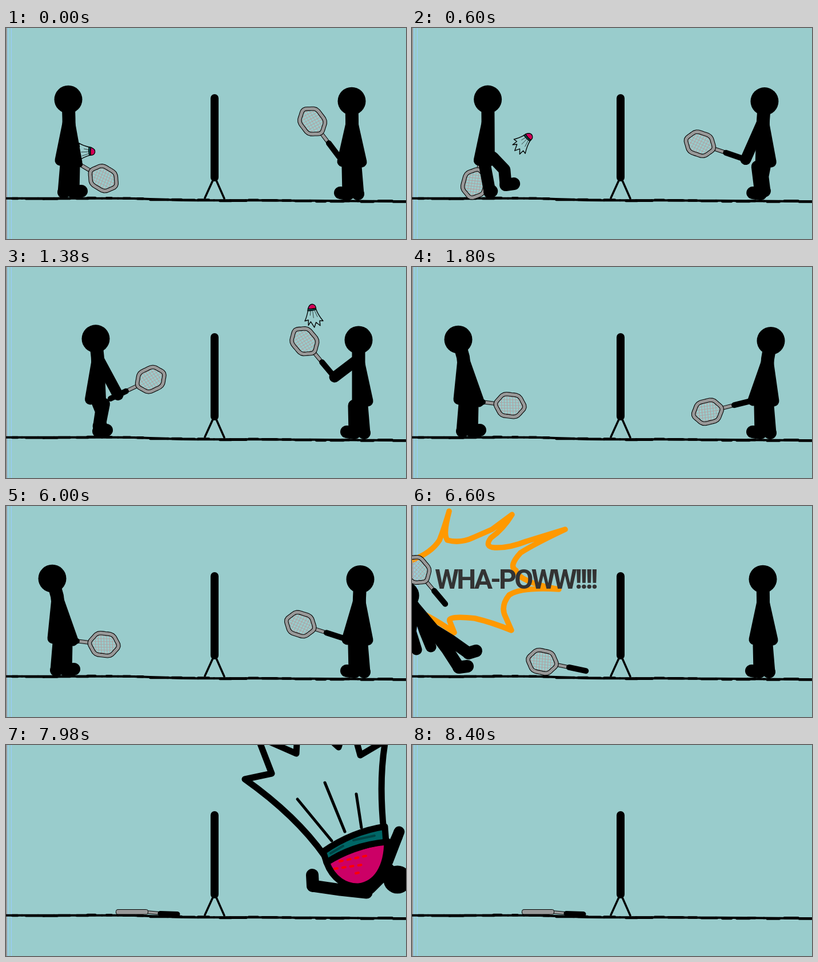
An HTML page with a canvas for the animation above (8640 ms loop, 700 px wide and 370 px high).

```html
<!DOCTYPE html>
<html lang="en">
<head>
<meta charset="utf-8">
<title>Badminton</title>
<style>
html, body { margin: 0; width: 100%; height: 100%; overflow: hidden; background: #99cccc; }
canvas { display: block; }
</style>
</head>
<body>
<canvas id="stage" width="700" height="370"></canvas>
<script>
const c = document.getElementById('stage').getContext('2d');
const LOOP = 8640, STEP = 60;
const SKY = '#99cccc', GREY = '#999999', ORANGE = '#ff9900';

const mix = (a, b, k) => a + (b - a) * k;
const part = (t, from, to) => Math.min(1, Math.max(0, (t - from) / (to - from)));
const smooth = k => k * k * (3 - 2 * k);
const random = seed => Math.abs(Math.sin(seed * 12.9898) * 43758.5453) % 1;
const radians = degrees => degrees * Math.PI / 180;

function line(points, width, color = '#000') {
  c.beginPath();
  points.forEach(p => c.lineTo(...p));
  c.lineWidth = width;
  c.strokeStyle = color;
  c.stroke();
}

function outline(path, width, color = '#000') {
  c.lineWidth = width;
  c.strokeStyle = color;
  c.stroke(path);
}

function placed(x, y, draw) {
  c.save();
  c.translate(x, y);
  draw();
  c.restore();
}

// ---- scenery ----
const groundY = x => 298.8 + 3.4 * smooth(part(x, 200, 330)) + 2 * part(x, 450, 700);

function ground() {
  for (let x = 0; x < 700; x += 28) {
    line([[x, groundY(x)], [x + 28, groundY(x + 28)]], 4);
    const from = x + 12 * random(x + 1), to = from + 8 + 24 * random(x + 2);
    const y = groundY(from) + 2 * random(x + 3) - 1;
    line([[from, y], [to, y]], 4.5);
  }
}

function scenery() {
  c.fillStyle = SKY;
  c.fillRect(0, 0, 700, 370);
  c.fillStyle = '#99ccff';
  c.fillRect(3, 0, 1, 370);
  c.fillRect(9, 0, 1, 370);
  c.fillStyle = GREY;
  c.fillRect(0, 0, 2, 370);
  ground();
  line([[365, 123], [365, 262]], 14);
  line([[348, 298], [363, 265], [367, 265], [382, 299]], 3.5);
}

// ---- racket: head centre at the origin, handle towards -x ----
const rim = new Path2D();
for (let i = 0; i < 36; i++) {
  const a = radians(i * 10), r = 1 + .04 * Math.cos(6 * a);
  rim.lineTo(24.5 * r * Math.cos(a), 20 * r * Math.sin(a));
}
rim.closePath();

function racket(x, y, degrees, squash = 1) {
  placed(x, y, () => {
    c.scale(1, squash);
    c.rotate(radians(degrees));
    line([[-44, 0], [-26, 0]], 7);
    line([[-44, 0], [-26, 0]], 5, GREY);
    line([[-78, 0], [-48, 0]], 10);
    c.save();
    c.clip(rim);
    for (let i = -25; i <= 25; i += 5) {
      line([[i - 4, -25], [i + 4, 25]], .9, '#b89a9a');
      line([[-28, i + 3], [28, i - 3]], .9, '#a9a5a5');
    }
    c.restore();
    outline(rim, 7.5);
    outline(rim, 5.3, GREY);
  });
}

function flatRacket() {
  line([[246, 293], [268, 295]], 6);
  line([[246, 293], [268, 295]], 4, GREY);
  line([[270, 295.5], [300, 296.5]], 9);
  const edge = new Path2D();
  edge.roundRect(192.5, 288.5, 56, 8.5, 3);
  c.fillStyle = GREY;
  c.fill(edge);
  outline(edge, 1);
}

// ---- shuttlecock, drawn large around its cork ----
const feathers = new Path2D('M558 195Q508 124 418 60L465 50L440 -15L508 15L512 -60L582 4L600 -55L620 18L664 -8Q652 60 661 150');
const band = new Path2D('M555 187Q605 152 663 143L665 170Q605 176 561 206Z');
const cork = new Path2D('M561 206C572 236 595 249 617 248C648 244 667 215 667 168Q605 178 561 206Z');

function shuttle(x, y, degrees, scale) {
  placed(x, y, () => {
    c.rotate(radians(degrees - 70));
    c.scale(scale, scale);
    c.translate(-615, -210);
    outline(feathers, 11);
    line([[510, 95], [570, 168]], 5);
    line([[558, 66], [593, 152]], 5);
    line([[613, 86], [622, 145]], 5);
    for (const [shape, color] of [[cork, '#cc0066'], [band, '#006666']]) {
      c.fillStyle = color;
      c.fill(shape);
      outline(shape, 11);
    }
    line([[568, 190], [590, 177]], 4, '#004444');
    line([[608, 167], [645, 159]], 4, '#004444');
    c.setLineDash([5, 9]);
    line([[584, 204], [632, 194]], 4, '#ff0000');
    line([[575, 217], [630, 209]], 4, '#ff0000');
    c.setLineDash([]);
    line([[612, 225], [617, 224]], 4, '#ff0000');
  });
}

// ---- people ----
function figure({ head, neck, hip, arms, legs }) {
  line([head, head], 49);
  line([head, neck, hip], 23);
  arms.forEach(arm => line(arm, 19));
  legs.forEach(([top, knee, ankle, toe]) => {
    line([top, knee, ankle], 21);
    line([ankle, toe], 22);
  });
}

function leg(hipX, x, lift, toe) {
  const y = 288 - lift;
  return [[hipX, 240 - lift], [(hipX + x) / 2 + lift * .7, 264 - lift * 1.2], [x, y], [x + toe, y - 2]];
}

// Offsets count in the facing direction; "steps" is the walk phase in half turns.
const leftStart = { x: 111, steps: 0, lean: -2, handX: 13, handY: 236, angle: 31, grip: 54 };
const leftWait = { ...leftStart, x: 98, lean: -17, handX: 19, angle: 7, grip: 55 };
const left = {
  y: 0, dir: 1, letGo: 6540,
  keys: [
    [240, leftStart],
    [420, { ...leftStart, x: 107, handX: -24, handY: 218, angle: 150 }],
    [1020, { x: 229, steps: 2.5, lean: 4, handX: 46, handY: 213, angle: -58, grip: 72 }],
    [1740, leftWait]
  ]
};

const rightStart = { x: 606, steps: 0, lean: 1, handX: 17, handY: 231, angle: -53, grip: 88 };
const rightLow = { x: 617, steps: 2, lean: -9, handX: 37, handY: 225, angle: 7, grip: 82 };
const rightWait = { ...rightLow, lean: -11, handX: 20, handY: 231, angle: 14 };
const rightAim = { ...rightWait, lean: -3, angle: -18, grip: 86 };
const right = {
  y: 3, dir: -1, letGo: 6360,
  keys: [
    [240, rightStart], [900, rightLow], [1140, rightLow],
    [1380, { ...rightLow, lean: 0, handX: 42, handY: 190, angle: -50 }],
    [1740, rightWait], [5940, rightWait], [6000, rightAim],
    [6240, { ...rightAim, handX: -18, handY: 134, angle: -140 }],
    [6360, { ...rightAim, lean: 5, handX: 45, handY: 160, angle: -30 }],
    [6540, { ...rightAim, x: 615, lean: 1, handX: 16 }]
  ]
};

function poseAt(keys, t) {
  const next = keys.findIndex(([time]) => time > t);
  if (next <= 0) return keys.at(next)[1];
  const [from, a] = keys[next - 1], [to, b] = keys[next], k = smooth(part(t, from, to));
  return Object.fromEntries(Object.keys(a).map(name => [name, mix(a[name], b[name], k)]));
}

function player({ y, dir, letGo, keys }, t) {
  const { x, steps, lean, handX, handY, angle, grip } = poseAt(keys, t);
  const a = radians(angle), stride = Math.sin(steps * Math.PI), reach = Math.abs(stride);
  const neck = [lean * .5, 158], hand = [handX, handY];
  placed(x, y, () => {
    c.scale(dir, 1);
    if (t < letGo) racket(handX + grip * Math.cos(a), handY + grip * Math.sin(a), angle);
    figure({
      head: [lean, 125 + Math.abs(lean) * .13], neck, hip: [0, 232],
      arms: [[neck, hand], [neck, [-16, 232]]],
      legs: [
        leg(8, 7 + 18 * stride + 6 * reach, 13 * Math.max(0, stride), 14),
        leg(-6, -10 + 13 * reach, 13 * Math.max(0, -stride), 3)
      ]
    });
  });
}

const knockedBack = {
  head: [-12, 157], neck: [5, 180], hip: [36, 217],
  arms: [[[3, 185], [-2, 220], [8, 252]], [[12, 190], [22, 220], [33, 247]]],
  legs: [[[34, 215], [68, 236], [99, 258], [112, 254]], [[34, 215], [62, 252], [82, 283], [97, 281]]]
};

const crushed = {
  head: [685, 236], neck: [668, 218], hip: [636, 250],
  arms: [[[668, 204], [688, 152]], [[666, 200], [685, 160]]],
  legs: [[[631, 259], [585, 254], [537, 247], [536, 228]]]
};

// ---- flights ----
const SERVED = 660, RETURNED = 1260, GONE = 1500;

function rallyPoint(t) {
  const k = (t - SERVED) / (RETURNED - SERVED);
  return [547 - 332 * (1 - k) ** 3, 200 - 700 * k * (1 - k)];
}

function rally(t) {
  if (t < SERVED) {
    const k = part(t, 240, SERVED);
    return shuttle(mix(151, 215, k), mix(217, 200, k) - 100 * k * (1 - k), -50 * k, .125);
  }
  if (t < RETURNED) {
    const [x, y] = rallyPoint(t), [nextX, nextY] = rallyPoint(t + 1);
    return shuttle(x, y, Math.atan2(nextY - y, nextX - x) * 180 / Math.PI, .125);
  }
  const k = part(t, RETURNED, GONE);
  shuttle(mix(547, 525, k), mix(200, -60, k), -95, .125);
}

function thrownRacket(t, drift) {
  const k = 1 - (1 - part(t, 6360, 6600)) ** 2;
  racket(mix(500, 8, k) + Math.min(0, drift), mix(121, 112, k), mix(210, 590, k));
}

function droppedRacket(t) {
  const fall = part(t, 6480, 6600), tip = part(t, 6600, 7140), squash = 1 - .9 * tip;
  if (tip === 1) return flatRacket();
  racket(mix(172, 228, fall) - 8 * tip, mix(243, 273, fall) + 24 * (1 - squash), mix(7, 192, fall), squash);
}

const star = new Path2D('M0 95Q34 82 48 60Q56 40 65 9Q54 50 62 60Q85 66 108 55L140 41L175 15Q160 40 138 56' +
  'Q126 72 145 73Q170 74 200 62L268 41Q215 66 190 82Q168 106 182 113Q186 133 257 146' +
  'Q190 142 170 156Q154 176 164 195L174 218Q140 204 110 197Q62 192 66 202L74 222Q50 205 24 191');

function impact() {
  outline(star, 9.5, ORANGE);
  c.fillStyle = '#333333';
  c.font = '700 48px Roboto, sans-serif';
  c.letterSpacing = '-3.8px';
  c.fillText('WHA-POWW!!!!', 40, 145);
}

function render(t) {
  const drift = .7 * (6600 - t);
  const sinceSmash = t - 7980;
  const smashX = sinceSmash * (sinceSmash < 0 ? .8 : 1.5);
  const smashY = sinceSmash * (sinceSmash < 0 ? 1.8 : .08);

  scenery();
  if (t >= 6540 && t < 6780) impact();
  if (t >= 6540) droppedRacket(t);

  if (t < 6540) player(left, t);
  else if (t < 6840) placed(drift, -drift * .15, () => figure(knockedBack));

  if (sinceSmash < 0) player(right, t);
  else placed(smashX, smashY, () => figure(crushed));

  if (t >= 6360 && t < 6840) thrownRacket(t, drift);
  if (t < GONE) rally(t);
  if (t >= 7860) shuttle(615 + smashX, 210 + smashY, 70, 1);
}

c.lineCap = c.lineJoin = 'round';
const start = performance.now();
function tick() {
  const t = (performance.now() - start) % LOOP;
  render(Math.floor(t / STEP) * STEP);
  requestAnimationFrame(tick);
}
tick();
</script>
</body>
</html>
```
